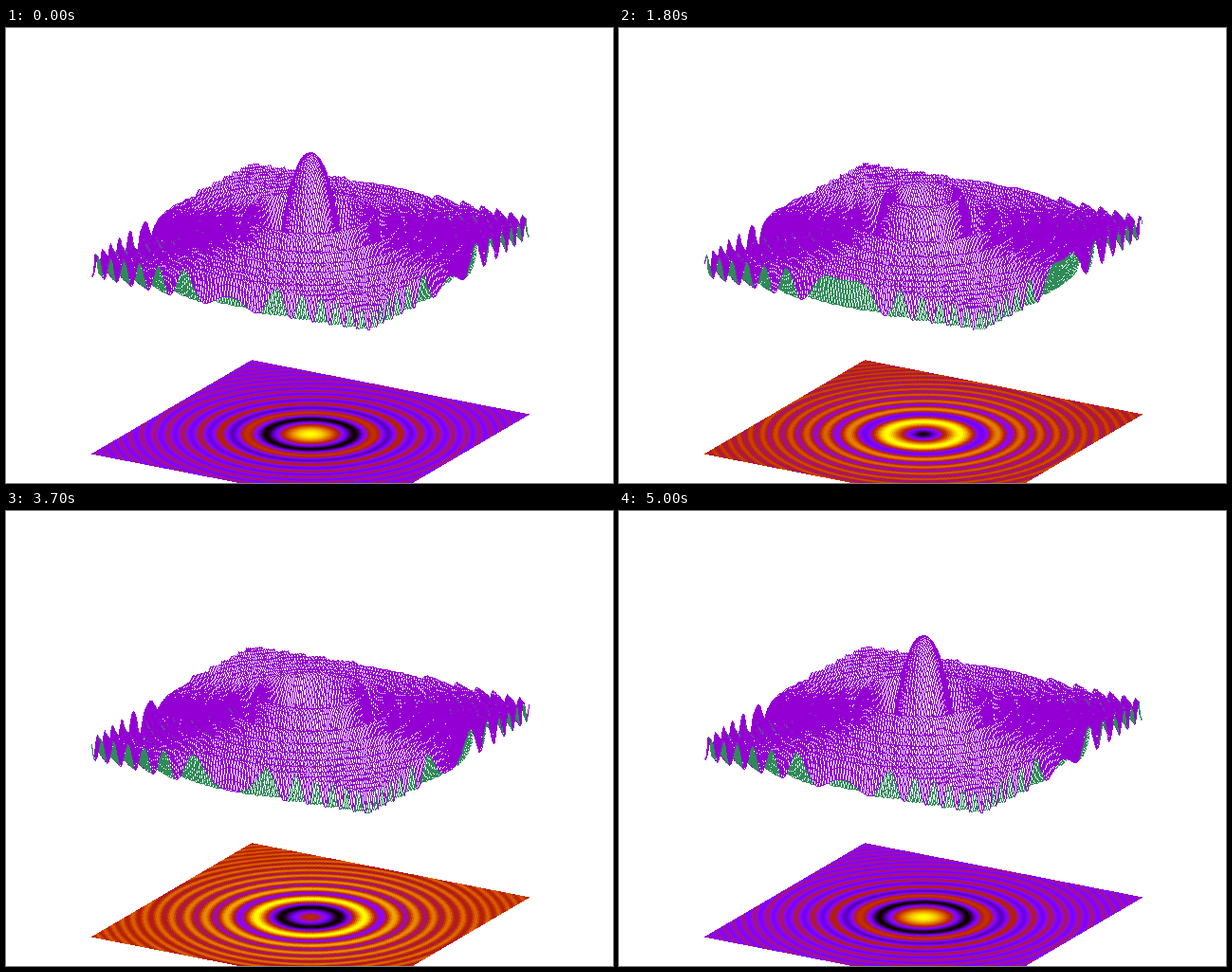
Animation, 640 px wide and 480 px high, one loop 5.1 s. Source, as a matplotlib script:

```python
import numpy as np
import matplotlib.pyplot as plt
from matplotlib.animation import FuncAnimation

W, H, DPI = 640, 480, 100
FRAMES, INTERVAL = 51, 100
SAMPLES = 200
HALF_RANGE = 2 * np.pi

# Orthographic view: pixel offsets for half of the x range, half of the y range
# and one unit of height (screen y points down).
X_AXIS = np.array([146.1, 28.55])
Y_AXIS = np.array([84.4, -49.45])
Z_UNIT = 98.9
CENTER = np.array([320.5, 428.0])
BASE = -2

BLANK, TOP, UNDERSIDE = 0, 1, 2
COLORS = np.array([(255, 255, 255), (148, 0, 211), (46, 139, 87)], dtype=np.uint8)
HEAT = plt.get_cmap("gnuplot")

# Rows run from the back to the front, so later quads cover earlier ones.
axis = np.linspace(-1, 1, SAMPLES)
u, v = np.meshgrid(axis, axis[::-1])
ground = CENTER + u[..., None] * X_AXIS + v[..., None] * Y_AXIS
r2 = HALF_RANGE**2 * (u**2 + v**2)


def map_lookup():
    """Stage mask of the flat map, and the grid cell under each of its pixels."""
    rows, cols = np.indices((H, W))
    offset = np.stack([cols, rows], axis=-1) - CENTER
    uv = offset @ np.linalg.inv(np.column_stack([X_AXIS, Y_AXIS])).T
    inside = (np.abs(uv) <= 1.004).all(axis=-1)
    uv = uv[inside] * [1, -1]
    cell = np.floor((uv + 1) / 2 * (SAMPLES - 1)).astype(int)
    cell = cell.clip(0, SAMPLES - 2)
    return inside, cell[:, 1], cell[:, 0]


map_mask, map_row, map_col = map_lookup()


def wave(phase):
    return np.cos(r2 - phase) / np.sqrt(1 + r2)


def draw_lines(canvas, start, end, code):
    """Draw one-pixel lines in order; later ones cover earlier ones."""
    delta = end - start
    steps = np.maximum(np.ceil(np.abs(delta).max(axis=1)), 1).astype(int)
    count = steps + 1
    first = np.cumsum(count) - count
    k = np.arange(count.sum()) - np.repeat(first, count)
    step = delta / steps[:, None]
    x, y = (
        np.floor(np.repeat(start[:, n], count)
                 + np.repeat(step[:, n], count) * k + 0.5).astype(int)
        for n in (0, 1)
    )
    canvas.reshape(-1)[y * W + x] = np.repeat(code, count)


def draw_surface(z):
    points = ground.copy()
    points[..., 1] -= (z - BASE) * Z_UNIT
    a = points[1:, 1:] - points[:-1, :-1]
    b = points[1:, :-1] - points[:-1, 1:]
    facing = a[..., 0] * b[..., 1] - a[..., 1] * b[..., 0] > 0
    ink = np.where(facing, TOP, UNDERSIDE).astype(np.uint8)

    # Each quad blanks its middle, then draws its back and left edges;
    # the other two belong to the quads in front of it.
    p = np.floor(points + 0.5)
    p00, p01, p10, p11 = p[:-1, :-1], p[:-1, 1:], p[1:, :-1], p[1:, 1:]
    start = np.stack([(p00 + p10) / 2, (p00 + p01) / 2, p00, p00], axis=2)
    end = np.stack([(p01 + p11) / 2, (p10 + p11) / 2, p01, p10], axis=2)
    blank = np.full_like(ink, BLANK)
    code = np.stack([blank, blank, ink, ink], axis=2)

    canvas = np.zeros((H, W), dtype=np.uint8)
    draw_lines(canvas, start.reshape(-1, 2), end.reshape(-1, 2), code.ravel())
    draw_lines(canvas, p[-1, :-1], p[-1, 1:], ink[-1])
    draw_lines(canvas, p[:-1, -1], p[1:, -1], ink[:, -1])
    return COLORS[canvas]


def draw_map(image, z):
    cells = (z[:-1, :-1] + z[1:, :-1] + z[:-1, 1:] + z[1:, 1:]) / 4
    level = (cells - z.min()) / (z.max() - z.min())
    image[map_mask] = HEAT(level, bytes=True)[map_row, map_col, :3]


def update(i):
    z = wave(2 * np.pi * i / (FRAMES - 1))
    image = draw_surface(z)
    draw_map(image, z)
    stage.set_data(image)
    return [stage]


fig = plt.figure(figsize=(W / DPI, H / DPI), dpi=DPI, facecolor="white")
ax = fig.add_axes([0, 0, 1, 1])
ax.axis("off")
stage = ax.imshow(np.full((H, W, 3), 255, dtype=np.uint8),
                  aspect="auto", interpolation="nearest")

anim = FuncAnimation(fig, update, frames=FRAMES, interval=INTERVAL,
                     repeat=True, repeat_delay=0)
plt.show()
```
